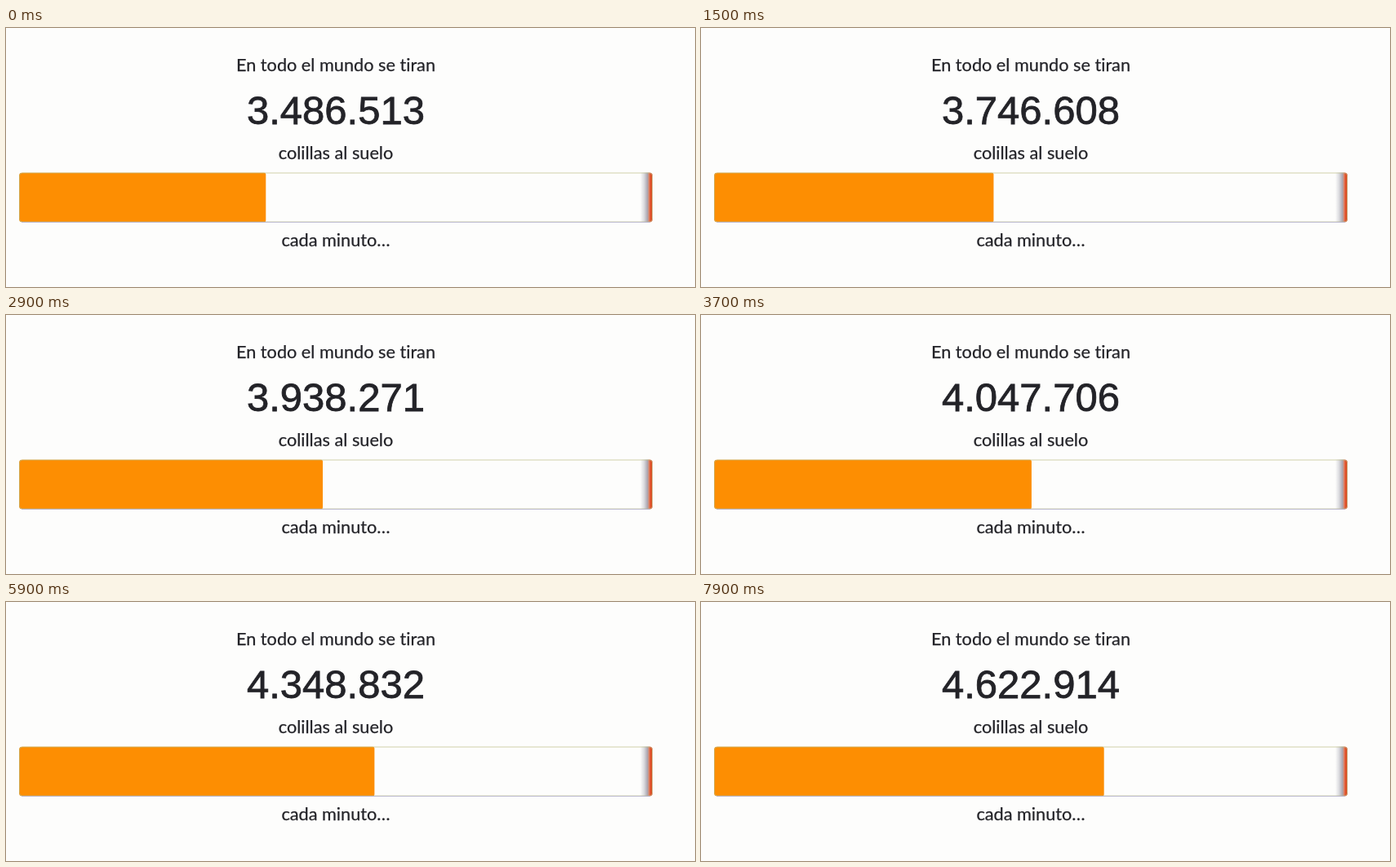
These frames come from a looping animation (844x318 px, 8000 ms). An HTML page:

```html
<!DOCTYPE html>
<html lang="es">
<head>
<meta charset="utf-8">
<title>Colillas</title>
<style>
  html, body { margin: 0; width: 100%; height: 100%; overflow: hidden; background: #fdfdfc; }
  svg { display: block; width: 844px; height: 318px; }
  text { text-anchor: middle; fill: #232328; stroke: #232328; font-variant-ligatures: none; }
  .label { font: 21.7px Lato, "Noto Sans", sans-serif; font-variant-ligatures: none; stroke-width: .25px; }
  .count { font: 49px "Liberation Sans", Arial, sans-serif; stroke-width: .8px; }
</style>
</head>
<body>
<svg viewBox="0 0 844 318">
  <defs>
    <linearGradient id="ash">
      <stop offset="0" stop-color="#fdfdfc"/>
      <stop offset=".3" stop-color="#dcdce0"/>
      <stop offset=".6" stop-color="#a9a4ae"/>
      <stop offset=".7" stop-color="#d98a70"/>
      <stop offset=".82" stop-color="#e2522c"/>
      <stop offset="1" stop-color="#d8451c"/>
    </linearGradient>
    <clipPath id="tube"><rect x="16" y="177.5" width="776" height="61" rx="4"/></clipPath>
  </defs>
  <text class="label" x="404" y="53">En todo el mundo se tiran</text>
  <text class="count" id="count" x="404" y="117.5"></text>
  <text class="label" x="404" y="160.6">colillas al suelo</text>
  <text class="label" x="404" y="268.4">cada minuto…</text>
  <g clip-path="url(#tube)">
    <rect x="777" y="177" width="15" height="62" fill="url(#ash)"/>
    <rect id="fill" x="16" y="177.5" height="61" rx="2.5" fill="#fd8e02"/>
  </g>
  <rect x="16.5" y="178" width="775" height="60" rx="3.5" fill="none" stroke="#b9ba80" stroke-opacity=".65"/>
  <path d="M19 238.5H789" stroke="#b4b2d2" stroke-opacity=".8"/>
</svg>
<script>
  const LOOP = 8000, STEP = 100;
  // time in ms, butts counted
  const knots = [
    [0, 3486513], [900, 3664380], [2100, 3828835], [3700, 4047706],
    [4700, 4184446], [5900, 4348832], [7900, 4622914]
  ];
  const count = document.getElementById('count');
  const fill = document.getElementById('fill');

  function valueAt(t) {
    const i = Math.max(1, knots.findIndex(k => k[0] >= t));
    const [t0, v0] = knots[i - 1], [t1, v1] = knots[i];
    return Math.round(v0 + (v1 - v0) * (t - t0) / (t1 - t0));
  }

  function draw(now) {
    const t = Math.floor(now % LOOP / STEP) * STEP;
    const value = valueAt(t);
    count.textContent = String(value).replace(/\B(?=(\d{3})+$)/g, '.');
    fill.setAttribute('width', 302.3 + (value - knots[0][1]) / 6480);
    requestAnimationFrame(() => draw(performance.now() - start));
  }

  const start = performance.now();
  draw(0);
</script>
</body>
</html>
```
